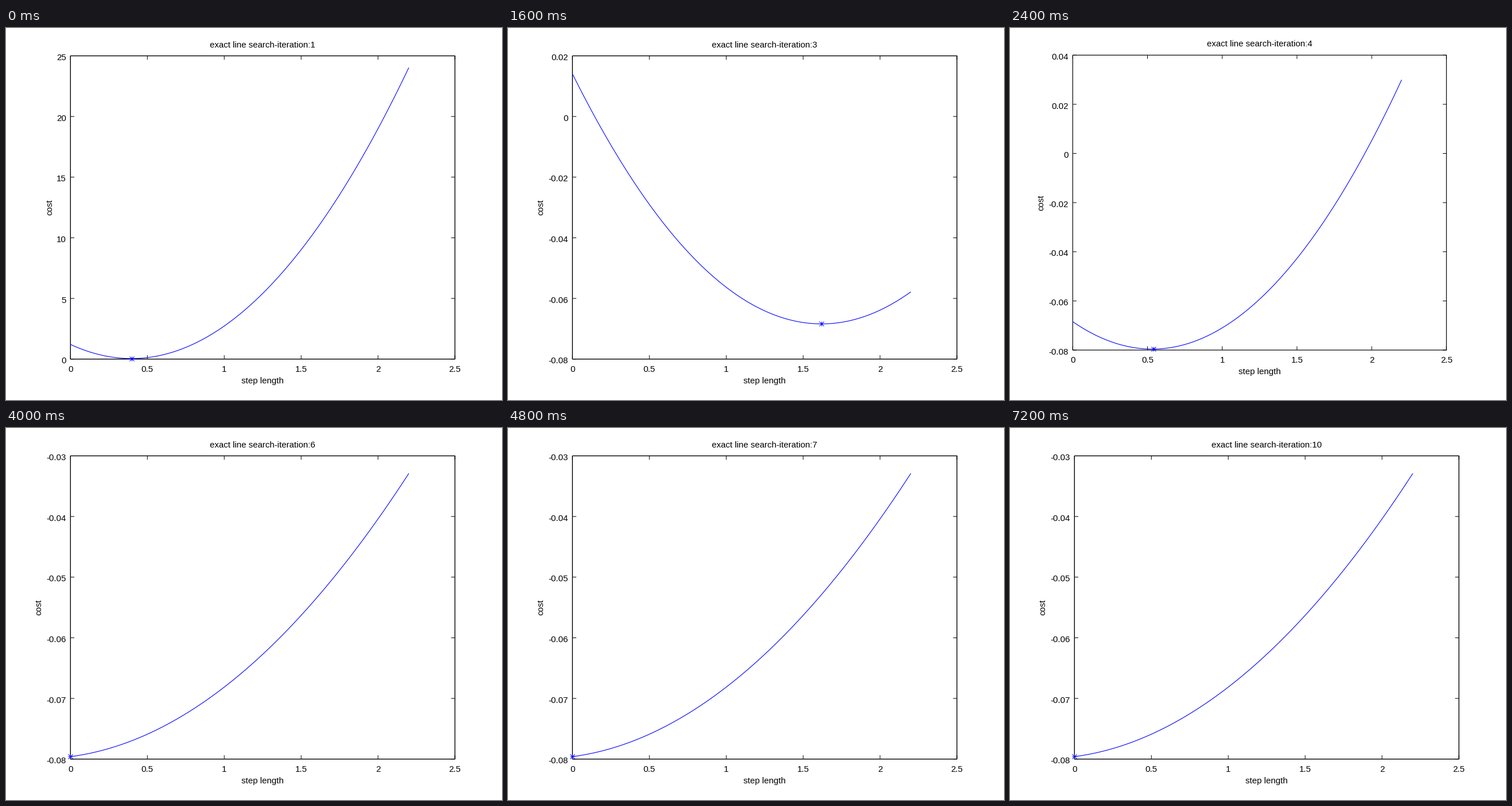
Write a matplotlib script that moves like this. It is 864x648 px and loops after 8000 ms.

```python
import numpy as np
import matplotlib.pyplot as plt
from matplotlib.animation import FuncAnimation

W, H = 864, 648
STEPS = np.linspace(0, 2.2, 111)
X_MAX = 2.5

# Pixel geometry of the two alternating page layouts
WIDE = dict(left=112.3, right=782, top=48.5, bottom=576.7, tick=6.7, border=1.4,
            title=34, xtick=599, xlabel=618.7, ytick=104.8)
NARROW = dict(left=109.3, right=760.3, top=47.3, bottom=561, tick=6.5, border=1.2,
              title=32.4, xtick=583, xlabel=602.8, ytick=102)

# layout, (low, high, tick step), (curvature, vertex, minimum), best step, ylabel x
STAGES = [
    (WIDE, (0, 25, 5), (7.378, 0.397, 0.043), 0.4, 80.5),
    (NARROW, (0, 0.7, 0.1), (0.1831, 0.4, 0.0143), 0.4, 73.5),
    (WIDE, (-0.08, 0.02, 0.02), (0.03141, 1.62, -0.0684), 1.62, 61.5),
    (NARROW, (-0.08, 0.04, 0.02), (0.03938, 0.532, -0.0796), 0.54, 58.5),
    (WIDE, (-0.08, -0.03, 0.01), (0.008134, -0.2048, -0.07994), 0, 61.5),
]

plt.rcParams["font.family"] = "Liberation Sans"
fig = plt.figure(figsize=(W / 72, H / 72), dpi=72, facecolor="white")
ax = fig.add_axes([0, 0, 1, 1])


def line(xs, ys, color="black", width=1.0):
    ax.plot(xs, ys, color=color, lw=width, snap=False, solid_capstyle="butt")


def label(x, y, text, ha="center", **kw):
    ax.text(x, y, text, fontsize=15, ha=ha, va="baseline", color="black", **kw)


def number(v):
    return f"{round(v, 2) + 0.0:g}"


def draw(i):
    ax.cla()
    ax.set(xlim=(0, W), ylim=(H, 0))
    ax.axis("off")

    page, (low, high, step), (a, vertex, floor), best, ylabel_x = STAGES[min(i, 4)]
    left, right, top, bottom = (page[k] for k in ("left", "right", "top", "bottom"))
    tick = page["tick"]

    def px(x):
        return left + x / X_MAX * (right - left)

    def py(y):
        return bottom - (y - low) / (high - low) * (bottom - top)

    def cost(x):
        return a * (x - vertex) ** 2 + floor

    for v in np.arange(6) * 0.5:
        x = px(v)
        line([x, x], [bottom, bottom - tick])
        line([x, x], [top, top + tick])
        label(x, page["xtick"], number(v))
    for k in range(round((high - low) / step) + 1):
        v = low + k * step
        y = py(v)
        line([left, left + tick], [y, y])
        line([right, right - tick], [y, y])
        label(page["ytick"], y + 7.6, number(v), ha="right")

    line([left, right, right, left, left], [top, top, bottom, bottom, top],
         width=page["border"])

    mid_x, mid_y = (left + right) / 2, (top + bottom) / 2
    label(mid_x, page["title"], f"exact line search-iteration:{i + 1}")
    label(mid_x, page["xlabel"], "step length")
    label(ylabel_x, mid_y, "cost", rotation=90, rotation_mode="anchor")

    line(px(STEPS), py(cost(STEPS)), "blue", 1.1)
    for mark in "+x":
        ax.plot(px(best), py(cost(best)), mark, color="blue", ms=8, mew=1, snap=False)
    return []


anim = FuncAnimation(fig, draw, frames=10, interval=800, repeat=True,
                     repeat_delay=0, init_func=lambda: draw(0))
plt.show()
```
